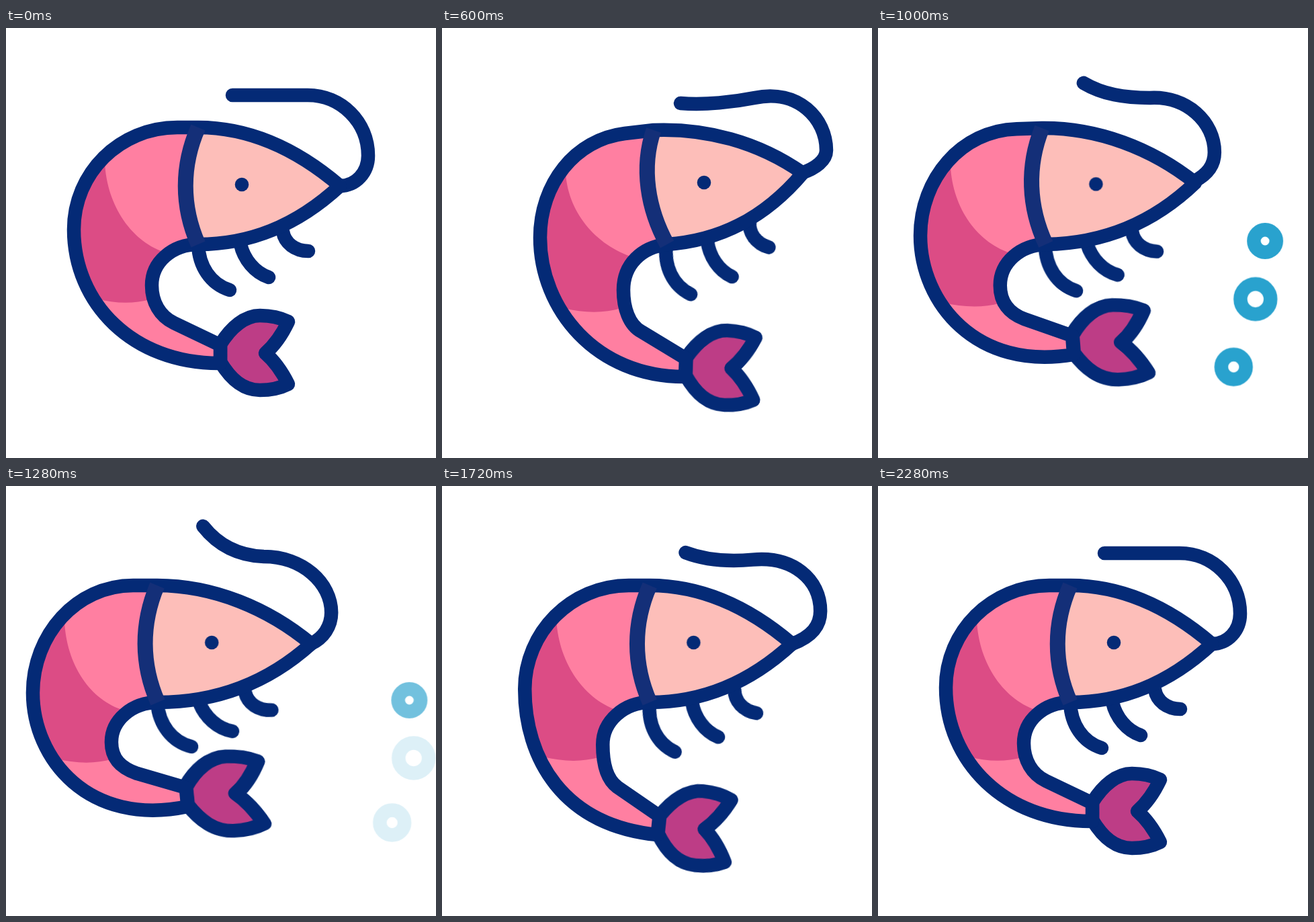
Write an HTML page without scripts that moves like this. It is 640 px wide and 640 px high and loops after 2600 ms.

```html
<!DOCTYPE html>
<html lang="en">
<head>
<meta charset="utf-8">
<title>Swimming shrimp</title>
<style>
html, body { margin: 0; width: 100%; height: 100%; overflow: hidden; background: #fff; }
svg { display: block; width: 100vw; height: 100vh; }
svg * {
  animation-duration: 2.6s;
  animation-iteration-count: infinite;
  animation-timing-function: cubic-bezier(.37, 0, .63, 1);
}
.line { fill: none; stroke: #042a76; stroke-width: 20.5; stroke-linecap: round; stroke-linejoin: round; }
.body { animation-name: body; }
.head { animation-name: head; fill: #fdbeb9; }
.shade { animation-name: shade; fill: #dc4c85; }
.neck { animation-name: neck; fill: none; stroke: #142f78; stroke-width: 23; }
.tail { animation-name: tail; fill: #bd3d86; }
.eye { animation-name: eye; fill: #042a76; }
.feeler { animation-name: feeler; }
.hip1 { animation-name: hip1; }
.hip2 { animation-name: hip2; }
.hip3 { animation-name: hip3; }
.leg1 { animation-name: leg1; }
.leg2 { animation-name: leg2; }
.leg3 { animation-name: leg3; }
.bubble { fill: none; stroke: #29a2ce; stroke-width: 20.5; animation-timing-function: linear; }
.b1 { animation-name: drift1, fade1; }
.b2 { animation-name: drift2, fade2; }
.b3 { animation-name: drift3, fade3; }

/* Poses: rest, coil, push back, glide, rest */
@keyframes body {
  0%, 7.692%, 87.692%, 100% { d: path("M286 148C365 148 435 182 497 235C430 297 360 322 286 322C248 322 217 348 217 383C217 408 229 429 250 439L319 472L319 499C188 500 101 409 101 300C101 216 169 148 255 148Z"); }
  23.077% { d: path("M315 152C392 149 470 169 537 216C477 287 409 317 335 322C297 326 270 352 270 390C270 416 278 442 297 452L363 492L362 519C229 520 146 418 146 312C146 232 198 166 272 157Z"); }
  46.154% { d: path("M221 148C305 148 387 182 451 235C382 297 302 322 222 322C184 322 153 348 153 381C153 406 168 419 192 427L265 447L268 475C120 508 36 406 36 308C36 222 100 148 185 148Z"); }
  69.231% { d: path("M313 148C392 148 462 182 524 235C457 297 387 322 313 322C275 322 243 350 243 385C243 413 248 437 264 449L326 493L323 521C182 505 127 405 127 302C127 218 196 148 282 148Z"); }
}
@keyframes head {
  0%, 7.692%, 87.692%, 100% { d: path("M286 148C365 148 435 182 497 235C430 297 360 322 286 322C261 265 261 205 286 148Z"); }
  23.077% { d: path("M315 152C392 149 470 169 537 216C477 287 409 317 335 322C306 269 296 208 315 152Z"); }
  46.154% { d: path("M221 148C305 148 387 182 451 235C382 297 302 322 222 322C197 265 197 205 221 148Z"); }
  69.231% { d: path("M313 148C392 148 462 182 524 235C457 297 387 322 313 322C288 265 288 205 313 148Z"); }
}
@keyframes neck {
  0%, 7.692%, 87.692%, 100% { d: path("M286 148C261 205 261 265 286 322"); }
  23.077% { d: path("M315 152C296 208 306 269 335 322"); }
  46.154% { d: path("M221 148C197 205 197 265 222 322"); }
  69.231% { d: path("M313 148C288 205 288 265 313 322"); }
}
@keyframes shade {
  0%, 7.692%, 87.692%, 100% { d: path("M147 200C150 265 188 320 240 335L217 383L215 404C190 411 160 410 136 403C112 372 101 340 101 300C101 262 120 222 147 200Z"); }
  23.077% { d: path("M184 216C188 278 234 328 291 343L270 392L267 417C240 425 210 424 182 417C158 386 146 352 146 311C146 275 158 240 184 216Z"); }
  46.154% { d: path("M83 201C86 266 121 319 172 334L153 382L154 407C129 414 98 413 70 406C46 376 36 345 36 307C36 267 54 223 83 201Z"); }
  69.231% { d: path("M174 200C178 265 217 320 269 335L243 385L237 404C211 411 182 410 154 403C134 372 127 340 127 301C127 262 146 222 174 200Z"); }
}
@keyframes tail {
  0%, 7.692%, 87.692%, 100% { transform: translate(319px, 484px) rotate(0deg) skewX(0deg) scale(1, 1); }
  23.077% { transform: translate(363px, 504px) rotate(2.1deg) skewX(0deg) scale(1.01, 1); }
  46.154% { transform: translate(266px, 459px) rotate(-2.8deg) skewX(3.8deg) scale(1.1, 1); }
  69.231% { transform: translate(325px, 506px) rotate(5.9deg) skewX(-.6deg) scale(1.02, 1); }
}
@keyframes eye {
  0%, 7.692%, 87.692%, 100% { transform: translate(351px, 233px); }
  23.077% { transform: translate(390px, 230px); }
  46.154% { transform: translate(303px, 233px); }
  69.231% { transform: translate(377.5px, 233px); }
}
@keyframes hip1 {
  0%, 7.692%, 87.692%, 100% { transform: translate(286px, 322px); }
  23.077% { transform: translate(334px, 322px); }
  46.154% { transform: translate(221px, 323px); }
  69.231% { transform: translate(313px, 322px); }
}
@keyframes hip2 {
  0%, 7.692%, 87.692%, 100% { transform: translate(349px, 322px); }
  23.077% { transform: translate(395px, 317px); }
  46.154% { transform: translate(284px, 323px); }
  69.231% { transform: translate(376px, 322px); }
}
@keyframes hip3 {
  0%, 7.692%, 87.692%, 100% { transform: translate(412px, 303px); }
  23.077% { transform: translate(458px, 288px); }
  46.154% { transform: translate(352px, 307px); }
  69.231% { transform: translate(439px, 303px); }
}
@keyframes leg1 {
  0%, 7.692%, 87.692%, 100% { transform: rotate(0deg); }
  15.385% { transform: rotate(4deg); animation-timing-function: linear; }
  26.923% { transform: rotate(11deg); }
  30.769% { transform: rotate(9.6deg); animation-timing-function: linear; }
  38.462% { transform: rotate(.6deg); animation-timing-function: ease-out; }
  46.154% { transform: rotate(-4deg); }
  58.462% { transform: rotate(-.8deg); }
  73.846% { transform: rotate(16deg); }
}
@keyframes leg2 {
  0%, 7.692%, 87.692%, 100% { transform: rotate(0deg); }
  15.385% { transform: rotate(2deg); animation-timing-function: linear; }
  26.923% { transform: rotate(8deg); }
  30.769% { transform: rotate(7deg); animation-timing-function: linear; }
  38.462% { transform: rotate(-4deg); animation-timing-function: ease-out; }
  46.154% { transform: rotate(-9deg); }
  58.462% { transform: rotate(-7deg); }
  73.846% { transform: rotate(14deg); }
}
@keyframes leg3 {
  0%, 7.692%, 87.692%, 100% { transform: rotate(0deg); }
  15.385% { transform: rotate(6deg); animation-timing-function: linear; }
  26.923% { transform: rotate(21deg); }
  30.769% { transform: rotate(19deg); animation-timing-function: linear; }
  38.462% { transform: rotate(2deg); animation-timing-function: ease-out; }
  46.154% { transform: rotate(-4deg); }
  58.462% { transform: rotate(0deg); }
  73.846% { transform: rotate(19deg); }
}
@keyframes feeler {
  0%, 7.692%, 87.692%, 100% { d: path("M337 100C375 100 412 100 449 100C499 100 539 140 539 190C539 215 521 235 497 235"); animation-timing-function: cubic-bezier(.47, 0, .75, .72); }
  15.385% { d: path("M347 103C385 102 425 101 455 98C510 90 556 140 556 183C556 206 541 220 517 226"); animation-timing-function: cubic-bezier(.39, .58, .57, 1); }
  23.077% { d: path("M355 112C392 115 435 110 465 104C530 90 572 135 572 182C572 197 556 209 535 216"); animation-timing-function: cubic-bezier(.47, 0, .75, .72); }
  30.769% { d: path("M332 108C370 113 405 109 440 102C503 88 546 125 546 175C546 190 533 205 513 217"); animation-timing-function: linear; }
  38.462% { d: path("M306 82C335 99 367 104 405 104C460 101 501 140 501 185C501 205 490 218 471 228"); animation-timing-function: cubic-bezier(.39, .58, .57, 1); }
  46.154% { d: path("M287 63C310 91 342 103 380 104C438 104 480 143 480 187C480 208 468 225 450 235"); animation-timing-function: cubic-bezier(.47, 0, .75, .72); }
  50.769% { d: path("M299 57C321 86 350 104 387 106C444 106 488 145 488 190C488 210 476 228 457 235"); animation-timing-function: linear; }
  58.462% { d: path("M344 75C367 95 395 104 430 105C485 105 528 145 528 190C528 213 514 226 490 235"); animation-timing-function: cubic-bezier(.39, .58, .57, 1); }
  69.231% { d: path("M364 101C398 113 436 113 465 110C525 104 566 138 566 186C566 208 553 224 524 235"); animation-timing-function: cubic-bezier(.47, 0, .75, .72); }
  73.846% { d: path("M357 106C392 116 430 113 460 109C518 101 560 135 560 185C560 207 548 223 519 235"); animation-timing-function: cubic-bezier(.33, .3, .6, 1); }
}

@keyframes drift1 {
  0%, 26.923% { transform: translate(516px, 313px); }
  30.769% { transform: translate(536px, 314px); }
  38.462% { transform: translate(576px, 317px); animation-timing-function: ease-out; }
  52%, 100% { transform: translate(602px, 319px); }
}
@keyframes drift2 {
  0%, 26.923% { transform: translate(478px, 402px); }
  30.769% { transform: translate(506px, 403px); }
  38.462% { transform: translate(561.5px, 403.5px); animation-timing-function: ease-out; }
  50%, 100% { transform: translate(607px, 405px); }
}
@keyframes drift3 {
  0%, 26.923% { transform: translate(463px, 512px); }
  30.769% { transform: translate(485px, 510px); }
  38.462% { transform: translate(529px, 504.5px); animation-timing-function: ease-out; }
  50%, 100% { transform: translate(575px, 501px); }
}
@keyframes fade1 {
  0%, 26.15% { opacity: 0; }
  30%, 47.7% { opacity: 1; }
  52.3%, 100% { opacity: 0; }
}
@keyframes fade2 {
  0%, 26.15% { opacity: 0; }
  30%, 45.4% { opacity: 1; }
  50%, 100% { opacity: 0; }
}
@keyframes fade3 {
  0%, 27.69% { opacity: 0; }
  31.8%, 45.4% { opacity: 1; }
  50%, 100% { opacity: 0; }
}
</style>
</head>
<body>
<svg viewBox="0 0 640 640">
  <circle class="bubble b1" r="16.7"/>
  <circle class="bubble b2" r="22.4"/>
  <circle class="bubble b3" r="18.4"/>

  <g class="hip1"><path class="line leg1" d="M0 0C1 32 18 59 47 68"/></g>
  <g class="hip2"><path class="line leg2" d="M0 0C5 22 21 42 42 49"/></g>
  <g class="hip3"><path class="line leg3" d="M0 0C3 17 18 29 38 29"/></g>

  <path class="line tail" d="M0-13C16-39 37-56 59-56C76-56 89-53 101-47C92-28 81-12 67 0C81 12 92 28 101 46C89 52 76 55 59 55C33 55 15 38 0 13Z"/>
  <path class="body" fill="#ff7fa1"/>
  <path class="shade"/>
  <path class="head"/>
  <path class="line feeler"/>
  <path class="line body"/>
  <path class="neck"/>
  <circle class="eye" r="10.3"/>
</svg>
</body>
</html>
```
